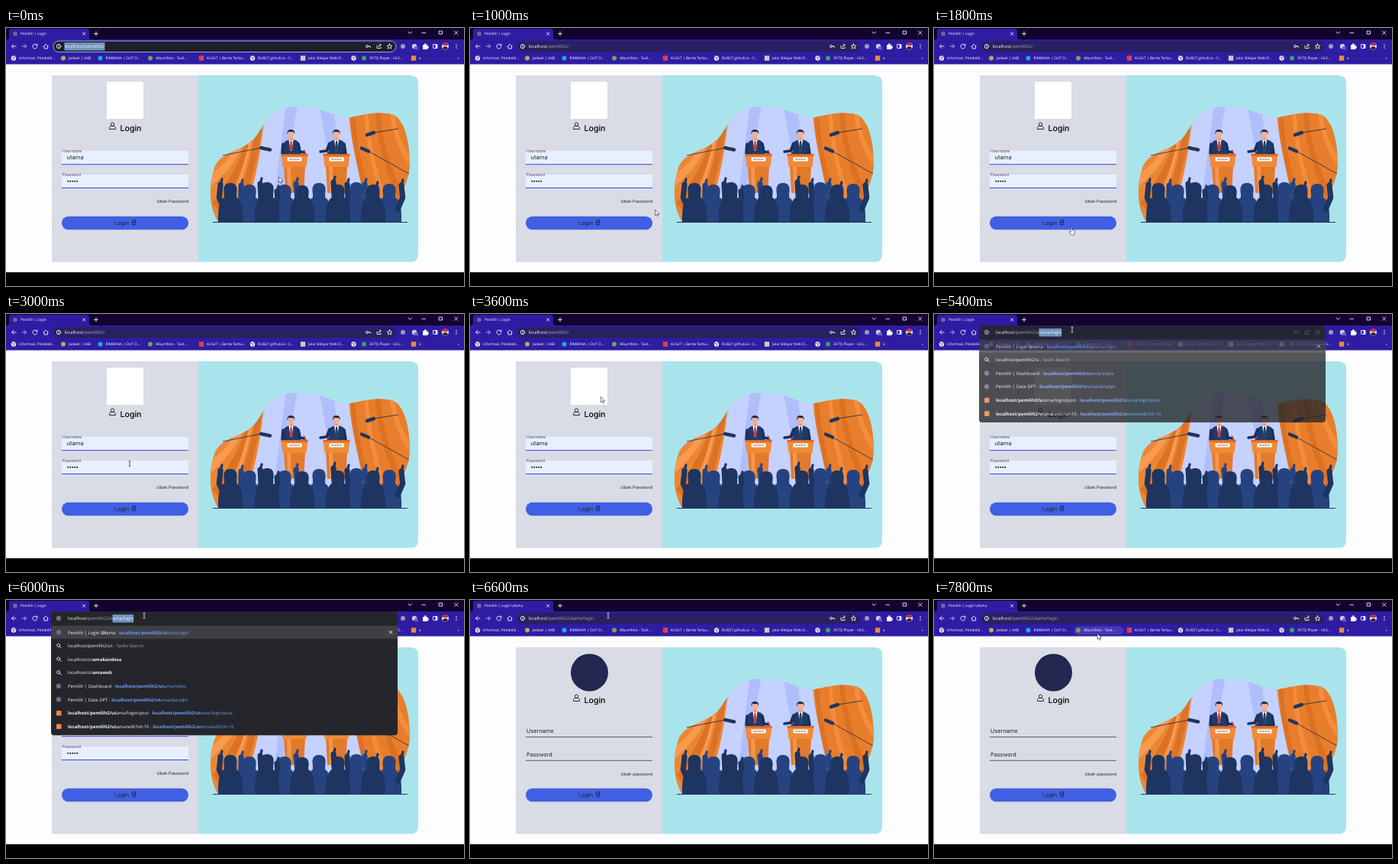
An HTML page for the animation above (8000 ms loop, 600x338 px).

```html
<!DOCTYPE html>
<html lang="id">
<head>
<meta charset="utf-8">
<title>Login</title>
<style>
html, body { margin: 0; width: 100%; height: 100%; overflow: hidden; background: #000; }
svg { display: block; width: 100%; height: 100%; }
text { font: 5.9px "Open Sans", sans-serif; white-space: pre; fill: #f1f2f5; text-rendering: geometricPrecision; }
.small { font-size: 4.8px; font-weight: 500; fill: #fff; }
.form text { font: 7.3px Inter, sans-serif; fill: #20222a; }
.form .heading { font-size: 10.6px; font-weight: 500; fill: #000; }
.form .value { font-size: 7.6px; }
.form .label { font-size: 5.2px; fill: #42454f; }
.form .note { font-size: 5.6px; text-anchor: end; }
.dim { fill: #a5a5b5; }
.link { fill: #6f9df5; }
.bold { font-weight: 700; }
.line { fill: none; stroke: #f0eefa; stroke-width: .9; stroke-linecap: round; stroke-linejoin: round; }
</style>
</head>
<body>
<svg viewBox="0 0 600 338" preserveAspectRatio="none">
  <defs>
    <g id="globe"><circle r="3.2" fill="#f1f0fa"/><path d="M-2-1l2 .3 1 1.2-1.4 1.8M1-2.6l1.4 1.8" fill="none" stroke="#2b1a9e" stroke-width=".8"/></g>
    <g id="person" fill="none" stroke="#17181f" stroke-width=".9"><circle cy="-2.3" r="2.2"/><path d="M-4 4c0-4 2-4.2 4-4.2S4 0 4 4z"/></g>
    <clipPath id="blob"><path d="M278 254C266 236 265 207 273 183C280 165 299 163 317 152C340 138 335 103 383 103C418 103 430 119 452 117C470 113 490 108 508 114C524 122 529 155 529 177C529 200 517 214 514 230L513 254Z"/></clipPath>
  </defs>

  <rect width="600" height="48" fill="#13042f"/>
  <path d="M0 15H1Q4 15 4 12V4Q4 1 7 1H106Q109 1 109 4V12Q109 15 112 15H600V48H0Z" fill="#2e1da3"/>
  <circle cx="12" cy="7.5" r="2.8" fill="#746982"/>
  <text id="tabTitle" class="small" x="19" y="9.3"></text>
  <path class="line" d="M100.3 5.8l3.4 3.4m0-3.4l-3.4 3.4M115.5 7.5h5m-2.5-2.5v5M527 5l2.3 2.3L531.6 5M545 6.3h4.5M567.5 4h4v4h-4zM587.5 4l4.4 4.4m0-4.4L587.5 8.4"/>

  <path class="line" d="M13 24H7.5m2.5-2.5L7.5 24l2.5 2.5M40.5 22.5a3 3 0 1 0 .3 2.5m.2-4v2h-2M49 24.2l3.2-3 3.2 3M50 23.5v3.5h4.4v-3.5"/>
  <path class="line" d="M21 24h5.5m-2.5-2.5l2.5 2.5-2.5 2.5" opacity=".75"/>
  <rect id="omnibox" x="62" y="17" width="449" height="14.5" rx="7.2"/>
  <g class="line"><circle cx="69" cy="24" r="2.7"/><path d="M69 23.7v1.5m0-2.7v.1"/><circle cx="473" cy="24" r="1.5"/><path d="M474.5 24h3v1.3M486 23v3.5h5v-1.5m-3-.5q.3-2.5 3-2.5m-1.3-1.3l1.5 1.3-1.5 1.3"/><path d="M502.5 20.800l.9 2.2 2.4.2-1.8 1.5.6 2.3-2.1-1.3-2.1 1.3.6-2.3-1.8-1.5 2.4-.2z"/></g>
  <circle cx="520" cy="24" r="3" fill="#a29cac"/>
  <circle cx="535" cy="24" r="3.2" fill="#c5c6d8"/><rect x="535" y="24.5" width="5" height="4" rx="1" fill="#6850ce"/>
  <path d="M546 22h2q0-2 1.2-2t1.2 2h2v2q1.6 0 1.6 1.2T552.4 26.4v1.6H546z" fill="#fff"/>
  <rect x="559.5" y="21.5" width="5.5" height="5" rx=".6" class="line"/><path d="M562.6 21.5h2.4v5h-2.4z" fill="#fff"/>
  <circle cx="575.5" cy="24" r="4.5" fill="#eceaf0"/><path d="M572 23q0-4 3.5-4t3.5 4z" fill="#c43132"/><path d="M572 27q1-3 3.5-3t3.5 3q-3 2.5-7 0" fill="#272331"/>
  <g fill="#eee"><circle cx="590" cy="21.7" r=".7"/><circle cx="590" cy="24" r=".7"/><circle cx="590" cy="26.3" r=".7"/></g>
  <rect id="hover" y="34.5" height="11" rx="5" fill="#4938b4"/>
  <g id="bookmarks"></g>
  <text class="small" x="591.5" y="41.3">»</text>

  <rect y="47.5" width="600" height="272.5" fill="#fdfdfe"/>
  <rect x="60" y="62" width="192" height="244.5" fill="#d9dce5"/>
  <path d="M252 62H530Q540 62 540 72V296.5Q540 306.5 530 306.5H252Z" fill="#a9e4ec"/>

  <g class="form">
    <use href="#person" x="139.5" y="128.5"/>
    <text class="heading" x="149.5" y="135">Login</text>
    <g id="filled">
      <rect x="132" y="70.5" width="48" height="48.5" fill="#fff"/>
      <path d="M73 161h166v17.5H73zM73 192h166v17.5H73z" fill="#e8f0fe"/>
      <path d="M73 178.7h166M73 209.5h166" stroke="#3c45dc"/>
      <text class="label" x="74" y="163">Username</text>
      <text class="value" x="79.5" y="172.3">utama</text>
      <text class="label" x="74" y="193.5">Password</text>
      <path d="M81.3 200.7h13" stroke="#111" stroke-width="2" stroke-linecap="round" stroke-dasharray="0 3"/>
      <text class="note" x="239" y="229">Ubah Password</text>
    </g>
    <g id="empty">
      <circle cx="156.5" cy="95" r="24.5" fill="#23264f"/>
      <path d="M73 179.5h166M73 210.3h166" stroke="#3b3d48" stroke-width=".8"/>
      <text x="74" y="173.5">Username</text>
      <text x="74" y="204.5">Password</text>
      <text class="note" x="239" y="230">Ubah password</text>
    </g>
    <rect x="73" y="246.8" width="166" height="17.4" rx="8.7" fill="#405fe2"/>
    <text x="142" y="258">Login</text>
    <path d="M166 253v-1.5h3.5v6H166V256m-1.8-1.5h3.5m-1.2-1.3l1.3 1.3-1.3 1.3" fill="none" stroke="#17181f" stroke-width=".8"/>
  </g>

  <g clip-path="url(#blob)">
    <rect x="260" y="100" width="275" height="156" fill="#b0befb"/>
    <path d="M345 100h22l-20 154h-38zM382 100h28l28 154h-84zM428 100h20l30 154h-28z" fill="#c5d1ff"/>
    <path d="M255 100h84C336 155 328 200 308 256H255z" fill="#ec8632"/>
    <path d="M327 130Q312 190 280 240L270 230Q305 185 319 135zM337 115Q330 185 302 256h-8Q318 190 330 120z" fill="#db7326"/>
    <path d="M311 152Q300 180 268 208v-16Q292 175 303 152zM322 150Q312 200 288 250h-6Q308 200 318 150z" fill="#f89b50"/>
    <path d="M449 100C449 150 467 200 475 256h65V100z" fill="#e87e2b"/>
    <path d="M457 110Q460 175 488 256h-8Q456 180 451 110zM484 105Q484 160 518 235l6-8Q492 160 490 105z" fill="#dc7122"/>
    <path d="M470 108Q470 170 500 245h6Q478 175 474 108zM502 105Q506 150 530 183v-14Q512 145 508 105z" fill="#f38d3e"/>
  </g>
  <g id="stage"></g>
  <path d="M271 254.5h255" stroke="#26365a"/>

  <g id="popup">
    <rect id="panel" x="59" y="15" width="454" rx="4" fill="#25262b"/>
    <path d="M59 33.7h454v17H59z" fill="#3e4045"/>
    <path class="line" d="M502 40.3l3.8 3.8m0-3.8l-3.8 3.8"/>
    <circle cx="69" cy="24" r="3.2" fill="#746982"/>
    <g id="rows"></g>
  </g>
  <rect id="selection" y="19" height="10.5" fill="#6f94be"/>
  <text id="url" y="26.2"></text>
  <path id="caret" d="M0 19.5v9" stroke="#fff" stroke-width=".7"/>
  <rect y="320" width="600" height="18"/>
  <g id="cursor"></g>
</svg>
<script>
const $ = id => document.getElementById(id);
const STEP = 200, LOOP = 8000, SITE = 'localhost/pemilih2/', FULL = SITE + 'utama/login';

// Icon x, icon colour (none = globe), right edge, title, square icon
const bookmarks = [
  [10, '', 66, 'Informasi, Pendidik...'],
  [75, '#c6a84a', 115, 'Jadwal | UKB'],
  [123.5, '#20a7ed', 181, 'RIMBANA | OUT O...'],
  [189, '#6ba75b', 248, 'Albumfoto - Tavil...'],
  [256, '#dc4052', 314, 'KLN27 | Berita Terba...', true],
  [323, '', 381, 'RUB27.github.io - S...'],
  [389, '#c3d3b8', 447, 'Jalur Belajar Web D...', true],
  [455.5, '', 460, ''],
  [469, '#29ad5b', 527, 'ZK7Q Player - HLS...'],
  [534, '#ed8a3a', 546, 'a', true]
];
function bookmarkIcon(x, color, square) {
  if (!color) return `<use href="#globe" x="${x}" y="39.5"/>`;
  return square ? `<rect x="${x - 3.2}" y="36.3" width="6.4" height="6.4" fill="${color}"/>`
    : `<circle cx="${x}" cy="39.5" r="3" fill="${color}"/>`;
}
$('bookmarks').innerHTML = bookmarks.map(([x, color, , title, square]) =>
  bookmarkIcon(x, color, square) + `<text class="small" x="${x + 7}" y="41.3">${title}</text>`).join('');

const NAVY = '#1d3560', BLUE = '#27437f';

function speaker(x, tie, arms) {
  return `<path d="M${x - 12} 167q0-16 5-19l5-2h5l5 2q5 3 5 19z" fill="#203a68"/>
    <path d="M${x - 3} 146h6l-2 15h-2z" fill="#fff"/><path d="M${x - 1} 148h2l1 10-2 4-2-4z" fill="${tie}"/>
    <path d="M${x - 2.5} 140h5v6l-2.5 2-2.5-2z" fill="#e99c79"/><ellipse cx="${x}" cy="139.5" rx="3.8" ry="5" fill="#f5b08c"/>
    <path d="M${x - 4.7} 139.5q-1.5-6 4-6.5 6.500-.2 5.2 6l-1.5-3.2q-4 1-6.5-.3z" fill="#172947"/>
    <path d="${arms}" fill="none" stroke="#18305a" stroke-width="3.5" stroke-linecap="round" stroke-linejoin="round"/>`;
}
function podium(x) {
  return `<path d="M${x - 14} 180h28l-2 36h-24z" fill="#e37a2a"/><path d="M${x - 10} 182h5l1 34h-5z" fill="#f4964a"/>
    <path d="M${x - 17.5} 165h35l-2 17h-31z" fill="#f08a38"/><path d="M${x - 17.5} 165h35v2.5h-35z" fill="#d86822"/>
    <rect x="${x - 9.5}" y="169.5" width="19" height="5" fill="#fff"/><path d="M${x - 7} 172h14" stroke="#53627c" stroke-width="1.2" stroke-dasharray="3 .6"/>`;
}
// Microphone with its head at (x1, y1) pointing to (x2, y2), on a rod ending at (x3, y3)
function boom(x1, y1, x2, y2, x3, y3) {
  return `<path d="M${x2} ${y2}L${x3} ${y3}" stroke="#293650" stroke-width=".9"/>
    <path d="M${x1} ${y1}L${x2} ${y2}" stroke="#22365d" stroke-width="4.5" stroke-linecap="round"/>`;
}
function listener(x, y, color) {
  return `<path d="M${x - 8} ${y + 5}q-3-15 8-15t8 15q1 6-3 7h-10q-4-1-3-7z" fill="${color}"/>
    <path d="M${x - 16} 254q-1-27 8-32l5-3h6l5 3q9 5 8 32z" fill="${color}"/>`;
}
function raisedArm(x1, x2, y, color) {
  return `<path d="M${x1} 240L${x2 + (x2 - x1) * .3} 222L${x2} ${y + 5}" fill="none" stroke="${color}" stroke-width="7" stroke-linejoin="round"/>
    <circle cx="${x2}" cy="${y + 4}" r="3.6" fill="${color}"/><path d="M${x2} ${y + 4}l2-7" stroke="${color}" stroke-width="3.2" stroke-linecap="round"/>`;
}
const heads = [[294, 213], [319, 215], [342, 212], [365, 215], [388, 216], [410, 213], [435, 215], [459, 212], [481, 215], [502, 214]];
const arms = [[287, 281, 201], [309, 308, 202], [330, 333, 200], [353, 355, 210], [375, 380, 200], [425, 429, 198], [444, 447, 201], [467, 470, 201], [489, 485, 205], [512, 518, 202]];
$('stage').innerHTML =
  speaker(373.5, '#d63742', 'M363 152l-1 12 5 1M383 152l2 10 6 1') + speaker(433, '#29395b', 'M424 151l-4 10-8 1M443 152l2 12-7 1') +
  podium(378) + podium(433) + '<path d="M393 165l-3-6M420 165l4-5" stroke="#d44343" stroke-width="1.2"/>' +
  boom(346, 159.5, 334, 157, 284, 167) + boom(473, 140, 482, 137, 514, 132) + boom(466, 157.5, 475, 161.5, 528, 191) +
  heads.map(([x, y], i) => i % 2 ? listener(x, y, BLUE) : '').join('') +
  arms.map(([a, b, y], i) => raisedArm(a, b, y, i % 3 === 1 ? BLUE : NAVY)).join('') +
  heads.map(([x, y], i) => i % 2 ? '' : listener(x, y, NAVY)).join('');

const span = (cls, s) => `<tspan class="${cls}">${s}</tspan>`;
const bold = s => span('bold', s);

function suggestions(typed) {
  const rest = 'utama'.slice(typed.length);
  const address = path => bold(SITE + typed) + rest + path;
  const row = (icon, title, path) => [icon, title + span('dim', ' - ') + span('link', address(path))];
  const start = typed[0].toUpperCase() + typed.slice(1);
  const list = [
    row('site', `Pemilih | Login ${bold(start)}${rest}`, '/login'),
    ['search', SITE + typed + span('dim', ' - Tavilo Search')],
    row('site', 'Pemilih | Dashboard', '/index'),
    row('site', 'Pemilih | Data DPT', '/datadpt'),
    row('page', address('/login/post'), '/login/post'),
    row('page', address('/edit?id=10'), '/edit?id=10')
  ];
  if (typed.length > 1)
    list.splice(2, 0, ...['amakandesa', 'amaweb'].map(end => ['search', 'localhost/ut' + bold(end)]));
  return list;
}
const icons = {
  site: y => `<circle cx="69" cy="${y}" r="3.2" fill="#746982"/>`,
  page: y => `<rect x="66" y="${y - 3}" width="6.5" height="6.5" rx="1" fill="#f38a43"/>`,
  search: y => `<path class="line" d="M70.5 ${y + 1}l2 2M70.7 ${y - .5}a2 2 0 1 0-4 0a2 2 0 1 0 4 0"/>`
};

function drawPopup(typed, opacity) {
  $('popup').style.display = typed ? '' : 'none';
  if (!typed) return;
  const list = suggestions(typed);
  $('popup').setAttribute('opacity', opacity);
  $('panel').setAttribute('height', 21.5 + 17.6 * list.length);
  $('rows').innerHTML = list.map(([icon, html], i) => {
    const y = 42.3 + 17.6 * i;
    return icons[icon](y) + `<text x="81" y="${y + 2.2}">${html}</text>`;
  }).join('');
}

// The host is bright, the path dim; characters from..to are selected
function drawUrl(address, x, from, to, caret) {
  const url = $('url'), host = address.indexOf('/');
  const part = (a, b) => address.slice(a, Math.min(b, host)) + span('dim', address.slice(Math.max(a, host), b));
  url.setAttribute('x', x);
  url.innerHTML = part(0, from) + address.slice(from, to) + part(Math.max(from, to), address.length);
  const start = from ? url.getSubStringLength(0, from) : 0;
  $('selection').setAttribute('x', x + start);
  $('selection').setAttribute('width', to > from ? url.getSubStringLength(from, to - from) : 0);
  $('caret').style.display = caret ? '' : 'none';
  $('caret').setAttribute('transform', `translate(${x + start + .5})`);
}

// Pointer path: time, x, y
const path = [[0, 357.5, 195], [400, 357.5, 195], [1400, 180, 261.5], [2000, 180, 261.5], [2700, 162, 196],
  [3200, 162, 196], [4000, 181, 20.5], [6700, 181, 20.5], [7500, 214, 44], [8000, 214, 44]];
function pointerAt(t) {
  const i = path.findIndex(p => p[0] > t);
  const [t0, x0, y0] = path[i - 1], [t1, x1, y1] = path[i];
  const k = (t - t0) / (t1 - t0), e = k * k * (3 - 2 * k);
  return [x0 + (x1 - x0) * e, y0 + (y1 - y0) * e];
}
const shapes = {
  arrow: '<path d="M0 0v7.5l1.8-1.6 1.2 2.7 1.2-.6-1.2-2.5h2.4z" fill="#fff" stroke="#222" stroke-width=".6"/>',
  hand: '<path d="M-.8 0q.8-1 1.6 0v3l3 .8q.8.3.6 1.6l-.7 4H-.5l-2.3-3.5q0-1 1-.8l1 .8z" fill="#fff" stroke="#222" stroke-width=".6"/>',
  text: '<path d="M-1.4-3.5Q0-3.5 0-2.8Q0-3.5 1.4-3.5M0-2.8v5.6M-1.4 3.5Q0 3.5 0 2.8Q0 3.5 1.4 3.5" fill="none" stroke="currentColor" stroke-width=".8"/>'
};
function drawPointer(t) {
  const [x, y] = pointerAt(t);
  const inside = (left, top, right, bottom) => x >= left && x <= right && y >= top && y <= bottom;
  const inUrl = inside(62, 17, 511, 31);
  const kind = inside(73, 246, 239, 265) ? 'hand'
    : inUrl || inside(73, 161, 239, 179) || inside(73, 192, 239, 210) ? 'text' : 'arrow';
  $('cursor').innerHTML = shapes[kind];
  $('cursor').setAttribute('color', inUrl ? '#fff' : '#333');
  $('cursor').setAttribute('transform', `translate(${x} ${y})`);
  const mark = bookmarks.find(([left, , right]) => inside(left - 5, 34.5, right, 45.5));
  $('hover').setAttribute('x', mark ? mark[0] - 5 : 0);
  $('hover').setAttribute('width', mark ? mark[2] - mark[0] + 5 : 0);
}

function draw(t) {
  const typed = t < 5400 || t >= 6400 ? '' : t < 5800 ? 'u' : 'ut';
  const newPage = t >= 6600;
  const selectAll = t < 800 || (t >= 4000 && t < 4400);
  const editing = t >= 4400 && t < 5400;
  const focused = selectAll || editing;
  drawPopup(typed, t < 5600 ? .78 : 1);
  if (typed) drawUrl(FULL, 81, SITE.length + typed.length, FULL.length, false);
  else if (t >= 6400) drawUrl(FULL, 76.5, 0, 0, false);
  else drawUrl(SITE, 76.5, editing ? SITE.length : 0, focused ? SITE.length : 0, editing && (t - 4400) % 1000 < 500);
  $('omnibox').setAttribute('fill', focused ? '#211e29' : '#2a2061');
  $('omnibox').setAttribute('stroke', focused ? '#87aee8' : 'none');
  $('tabTitle').textContent = 'Pemilih | Login' + (newPage ? ' Utama' : '');
  $('filled').style.display = newPage ? 'none' : '';
  $('empty').style.display = newPage ? '' : 'none';
  drawPointer(t);
}

const began = performance.now();
let shown = -1;
function tick() {
  const t = Math.floor((performance.now() - began) % LOOP / STEP) * STEP;
  if (t !== shown) draw(shown = t);
  requestAnimationFrame(tick);
}
tick();
</script>
</body>
</html>
```
